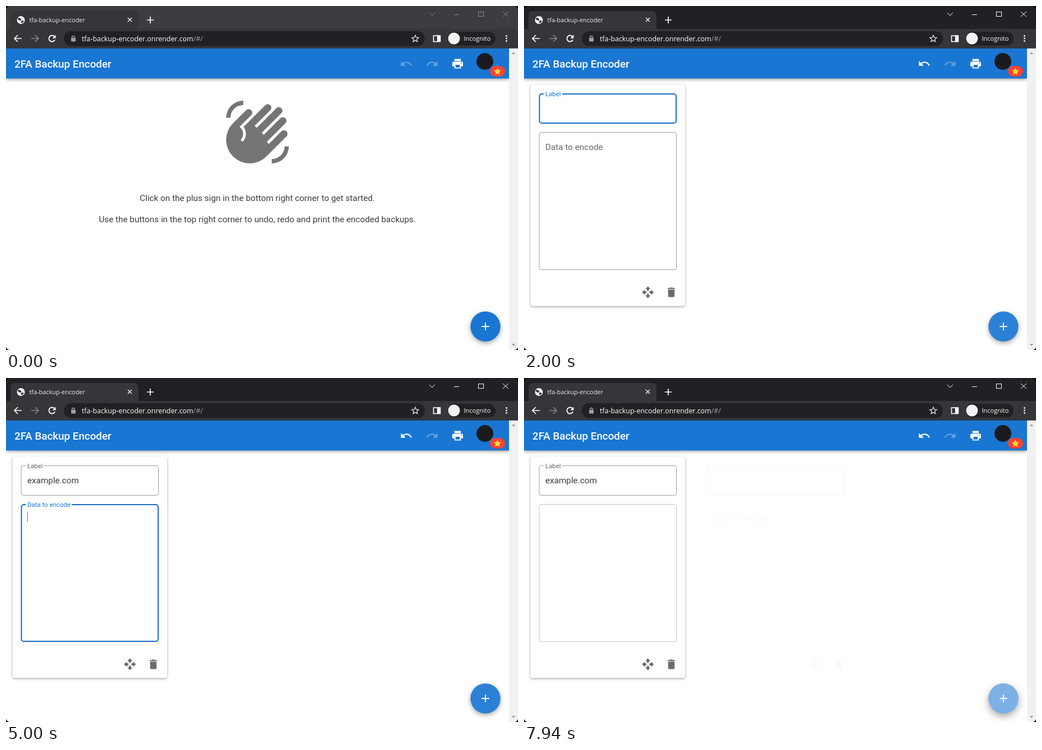
An HTML page with a canvas for the animation above (8000 ms loop, 912 by 614 pixels).

```html
<!DOCTYPE html>
<html lang="en">
<head>
<meta charset="utf-8">
<title>2FA Backup Encoder</title>
<style>
html, body { margin: 0; width: 100%; height: 100%; overflow: hidden; background: #000; }
canvas { display: block; }
</style>
</head>
<body>
<canvas id="stage" width="912" height="614"></canvas>
<script>
const ctx = document.getElementById('stage').getContext('2d');
const LOOP = 8000;
const BLUE = '#1976d2', INK = 'rgba(0,0,0,.77)', FAINT = 'rgba(0,0,0,.58)', BAR = '#35363a';
const PAGE_FONT = 'Roboto, sans-serif', CHROME_FONT = '"Open Sans", sans-serif';
const BODY = 15.25, SCALE = 0.953;
const SECRET = ['315f5bdb76d078c43b8ac0064e', '4a0164612b1fce77c869345bfc9', '4c75894edd3'];

// Key moments in ms
const T = { focus: 880, press: 1130, card: 1400, release: 1500, type: 2520, typeEnd: 3380,
            data: 3940, paste: 5290, blur: 5870, hover2: 7440, press2: 7560, card2: 7660 };

const tip = 'a1.25 1.25 0 0 0-1.77-1.77';
const ICONS = {
  undo: 'M12.5 8C9.85 8 7.45 9 5.6 10.6L2 7v9h9l-3.62-3.62c1.39-1.16 3.16-1.88 5.12-1.88 3.54 0 6.55 2.31 7.6 5.5l2.37-.78C21.08 11.03 17.15 8 12.5 8z',
  print: 'M18 3H6v4h12zM19 12a1 1 0 0 1 0-2 1 1 0 0 1 0 2zM16 19H8v-5h8zM19 8H5a3 3 0 0 0-3 3v6h4v4h12v-4h4v-6a3 3 0 0 0-3-3z',
  move: 'M10 9h4V6h3l-5-5-5 5h3zM9 10H6V7l-5 5 5 5v-3h3zM23 12l-5-5v3h-3v4h3v3zM14 15h-4v3H7l5 5 5-5h-3z',
  trash: 'M19 4h-3.5l-1-1h-5l-1 1H5v2h14zM6 19a2 2 0 0 0 2 2h8a2 2 0 0 0 2-2V7H6z',
  hand: 'M8.01 4.32l-4.6 4.6a8.25 8.25 0 0 0 11.67 11.67l7.07-7.07' + tip +
    'l-4.42 4.42-.71-.71 6.54-6.54' + tip + 'l-5.83 5.83-.71-.71 6.89-6.89' + tip +
    'l-6.89 6.89-.69-.7 5.48-5.48' + tip + 'l-7.62 7.62c1.22 1.57 1.11 3.84-.33 5.28l-.71-.71' +
    'a3 3 0 0 0 0-4.24l-.35-.35 4.07-4.07' + tip + 'z' +
    'M23 17a6 6 0 0 1-6 6v-1.5a4.5 4.5 0 0 0 4.5-4.5zM1 7a6 6 0 0 1 6-6v1.5A4.5 4.5 0 0 0 2.5 7z'
};
for (const k in ICONS) ICONS[k] = new Path2D(ICONS[k]);

const clamp = v => Math.max(0, Math.min(1, v));
const progress = (t, start, length) => clamp((t - start) / length);
const easeOut = v => 1 - Math.pow(1 - v, 3);

function icon(name, cx, cy, color, scale = SCALE, flip = 1) {
  ctx.save();
  ctx.translate(cx, cy);
  ctx.scale(scale * flip, scale);
  ctx.translate(-12, -12);
  ctx.fillStyle = color;
  ctx.fill(ICONS[name], 'evenodd');
  ctx.restore();
}

function text(str, x, y, size, color, { font = PAGE_FONT, weight = 400, align = 'left' } = {}) {
  ctx.font = `${weight} ${size}px ${font}`;
  ctx.fillStyle = color;
  ctx.textAlign = align;
  ctx.fillText(str, x, y);
  return ctx.measureText(str).width;
}

function rect(x, y, w, h, color) {
  ctx.fillStyle = color;
  ctx.fillRect(x, y, w, h);
}

function round(x, y, w, h, r, color) {
  ctx.beginPath();
  ctx.roundRect(x, y, w, h, r);
  ctx.fillStyle = color;
  ctx.fill();
}

function disc(x, y, r, color) {
  ctx.beginPath();
  ctx.arc(x, y, r, 0, 7);
  ctx.fillStyle = color;
  ctx.fill();
}

// Each path is a flat list x, y, x, y...
function lines(color, width, ...paths) {
  ctx.beginPath();
  for (const p of paths) {
    ctx.moveTo(p[0], p[1]);
    for (let i = 2; i < p.length; i += 2) ctx.lineTo(p[i], p[i + 1]);
  }
  ctx.strokeStyle = color;
  ctx.lineWidth = width;
  ctx.stroke();
}

function star(cx, cy, r, inner) {
  ctx.beginPath();
  for (let i = 0; i < 10; i++) {
    const a = i * Math.PI / 5 - Math.PI / 2, d = i % 2 ? r * inner : r;
    ctx.lineTo(cx + d * Math.cos(a), cy + d * Math.sin(a));
  }
  ctx.closePath();
}

function shadowed(blur, dy, alpha, draw) {
  ctx.save();
  ctx.shadowColor = `rgba(0,0,0,${alpha})`;
  ctx.shadowBlur = blur;
  ctx.shadowOffsetY = dy;
  draw();
  ctx.restore();
}

function drawBrowser(active) {
  const ui = { font: CHROME_FONT, weight: 500 };
  rect(0, 0, 912, 75.5, active ? '#202124' : '#3b3d40');
  round(8, 9, 228, 40, 8, BAR);
  rect(0, 41, 912, 34.5, BAR);

  disc(26.5, 25, 7, '#f1f3f4');
  ctx.beginPath();
  ctx.ellipse(24, 23.5, 3.4, 2, 0.5, 0, 7);
  ctx.ellipse(29, 28, 2.6, 1.8, -0.6, 0, 7);
  ctx.fillStyle = BAR;
  ctx.fill();
  text('tfa-backup-encoder', 41.5, 28.5, 10.9, '#e8eaed', ui);
  lines('#e8eaed', 1.5, [217, 21, 224, 28], [224, 21, 217, 28]);
  lines('#fff', 1.7, [251, 25, 263, 25], [257, 19, 257, 31]);

  const ctl = active ? '#fff' : '#85878a';
  lines(ctl, 1, [754, 12, 759, 17, 764, 12], [798, 15.5, 807, 15.5],
    [885, 10, 895, 19], [895, 10, 885, 19]);
  ctx.strokeRect(841.5, 10.5, 9, 8);

  lines('#fff', 1.7, [28, 58, 15, 58], [21, 52, 15, 58, 21, 64]);
  lines('#85878a', 1.7, [45, 58, 58, 58], [52, 52, 58, 58, 52, 64]);
  ctx.beginPath();
  ctx.arc(82, 58, 5.5, 0.4, 5.5);
  ctx.strokeStyle = '#fff';
  ctx.lineWidth = 1.8;
  ctx.stroke();
  ctx.beginPath();
  ctx.moveTo(88.5, 51.5); ctx.lineTo(88.5, 57.5); ctx.lineTo(82.5, 57.5);
  ctx.fillStyle = '#fff';
  ctx.fill();

  round(103, 45, 643, 26.5, 13.2, '#202124');
  round(116, 56.5, 8, 7, 1, '#9aa0a6');
  ctx.beginPath();
  ctx.arc(120, 56, 2.5, Math.PI, 0);
  ctx.strokeStyle = '#9aa0a6';
  ctx.lineWidth = 1.3;
  ctx.stroke();
  const w = text('tfa-backup-encoder.onrender.com', 135, 62.5, 12.4, '#fff', ui);
  text('/#/', 135 + w, 62.5, 12.4, '#9aa0a6', ui);

  star(729, 58.5, 6.4, 0.45);
  ctx.strokeStyle = '#dadce0';
  ctx.lineWidth = 1.3;
  ctx.stroke();
  ctx.strokeStyle = '#fff';
  ctx.lineWidth = 1.6;
  ctx.strokeRect(761.5, 53, 12, 10.5);
  rect(768, 52.5, 6, 11.5, '#fff');

  round(787, 46, 85, 24.5, 12.2, '#202124');
  disc(798, 58, 10.5, '#f1f3f4');
  text('Incognito', 815.5, 62, 11, '#fff', ui);
  for (const y of [53.5, 58, 62.5]) disc(891.5, y, 1.4, '#fff');
}

function drawAppBar(hasUndo) {
  shadowed(6, 2, 0.4, () => rect(0, 75, 896, 54.4, BLUE));
  text('2FA Backup Encoder', 15, 109.5, 18.8, '#fff', { weight: 500 });
  const dim = 'rgba(255,255,255,.32)';
  icon('undo', 713, 103, hasUndo ? '#fff' : dim);
  icon('undo', 759, 103, dim, SCALE, -1);
  icon('print', 804.5, 103, '#fff');
  disc(853, 99, 15, '#1b1b1f');
  round(862, 107, 27, 19, 9.5, '#f44336');
  star(875.3, 117, 7, 0.48);
  ctx.fillStyle = '#fdd835';
  ctx.fill();
}

function drawWelcome() {
  const centered = { align: 'center' };
  icon('hand', 448, 225, '#757575', 5.08);
  text('Click on the plus sign in the bottom right corner to get started.', 447.7, 348, BODY, INK, centered);
  text('Use the buttons in the top right corner to undo, redo and print the encoded backups.', 447.7, 386, BODY, INK, centered);
}

// lift moves the label from inside the field into the gap of its border
function drawField(y, h, name, restY, lift, focused, border) {
  const inset = focused ? 1 : 0.5;
  ctx.beginPath();
  ctx.roundRect(26.5 + inset, y + inset, 245.5 - 2 * inset, h - 2 * inset, 4);
  ctx.strokeStyle = focused ? '#1a6cc2' : border;
  ctx.lineWidth = focused ? 2 : 1;
  ctx.stroke();
  if (!name) return;
  const size = BODY * (1 - 0.25 * lift);
  if (lift > 0) {
    ctx.font = `${BODY * 0.75}px ${PAGE_FONT}`;
    rect(35, y - 1, (ctx.measureText(name).width + 5) * Math.min(1, lift * 1.5), 4, '#fff');
  }
  text(name, 38, restY + (y + 4.8 - restY) * lift, size, focused ? BLUE : 'rgba(0,0,0,.6)');
}

function drawCaret(x, y, since) {
  if (since % 1060 < 530) rect(Math.round(x), y, 1, 18, '#4a6f9c');
}

function drawCard(dx, alpha, s) {
  ctx.save();
  ctx.translate(dx, 0);
  shadowed(4, 1.5, 0.36, () => round(11.5, 140, 275.5, 395.5, 4, '#fff'));

  drawField(156, 54, 'Label', 188.2, 1, s.focus === 'label', '#9a9a9a');
  const w = text(s.label, 38, 188, BODY, INK);
  if (s.focus === 'label') drawCaret(38 + w, 174, s.caret);

  drawField(225, 246, s.encoded ? '' : 'Data to encode', 256.5, s.dataLift, s.focus === 'data', s.encoded ? '#c2c2c2' : '#9a9a9a');
  if (!s.encoded) {
    let end = 0;
    s.data.forEach((line, i) => end = text(line, 38, 252.8 + 26.6 * i, BODY, INK));
    const row = Math.max(0, s.data.length - 1);
    if (s.focus === 'data') drawCaret(38 + end, 239 + Math.round(26.6 * row), s.caret);
  }
  icon('move', 220.7, 511, FAINT);
  icon('trash', 262.4, 511, FAINT);

  // A white veil fades the card and its shadow as one group
  rect(0, 130, 298, 420, `rgba(255,255,255,${1 - alpha})`);
  ctx.restore();
}

function drawFab(hover, grow, fade) {
  const lift = grow * (1 - fade);
  shadowed(8 + 6 * lift, 3 + 2 * lift, 0.36, () => disc(854, 572, 26.7, BLUE));
  if (hover) disc(854, 572, 26.7, 'rgba(255,255,255,.08)');
  if (lift > 0) {
    ctx.save();
    ctx.beginPath();
    ctx.arc(854, 572, 26.7, 0, 7);
    ctx.clip();
    disc(854, 572, 6 + 22 * grow, `rgba(255,255,255,${0.38 * (1 - fade)})`);
    ctx.restore();
  }
  rect(847.3, 571, 13.4, 2, '#fff');
  rect(853, 565.3, 2, 13.4, '#fff');
}

function cardState(t) {
  const head = t < T.type ? 0 : Math.min(7, 1 + Math.floor((t - T.type) / 95));
  const tail = t < T.typeEnd ? 0 : Math.min(4, 1 + Math.floor((t - T.typeEnd) / 100));
  const lastInput = t >= T.paste ? T.paste : t >= T.data ? T.data
    : tail ? T.typeEnd + (tail - 1) * 100 : head ? T.type + (head - 1) * 95 : T.card;
  return {
    label: 'example.com'.slice(0, head + tail),
    dataLift: easeOut(progress(t, T.data, 300)),
    data: t >= T.paste ? SECRET : [],
    encoded: t >= T.blur,
    focus: t >= T.blur ? '' : t < T.data ? 'label' : 'data',
    caret: t - lastInput
  };
}

function draw(t) {
  ctx.clearRect(0, 0, 912, 614);
  ctx.save();
  ctx.beginPath();
  ctx.roundRect(0, 0, 912, 614, 7);
  ctx.clip();
  rect(0, 75, 912, 539, '#fff');

  if (t < T.card) drawWelcome();
  else drawCard(0, progress(t, T.card, 300), cardState(t));
  if (t >= T.card2) drawCard(298.5, 0.03, cardState(T.card));

  const again = t >= T.press2;
  const hover = (t >= T.focus && t < T.blur) || t >= T.hover2;
  drawFab(hover, easeOut(progress(t, again ? T.press2 : T.press, 320)),
    again ? 0 : progress(t, T.release, 300));

  drawAppBar(t >= T.card);
  rect(896, 75, 16, 539, '#f1f1f1');
  ctx.fillStyle = '#a3a3a3';
  for (const [y, d] of [[86, -4], [603, 4]]) {
    ctx.beginPath();
    ctx.moveTo(900.5, y); ctx.lineTo(907.5, y); ctx.lineTo(904, y + d);
    ctx.fill();
  }
  drawBrowser(t >= T.focus);
  ctx.restore();
}

function loop() {
  draw(performance.now() % LOOP);
  requestAnimationFrame(loop);
}
loop();
</script>
</body>
</html>
```
